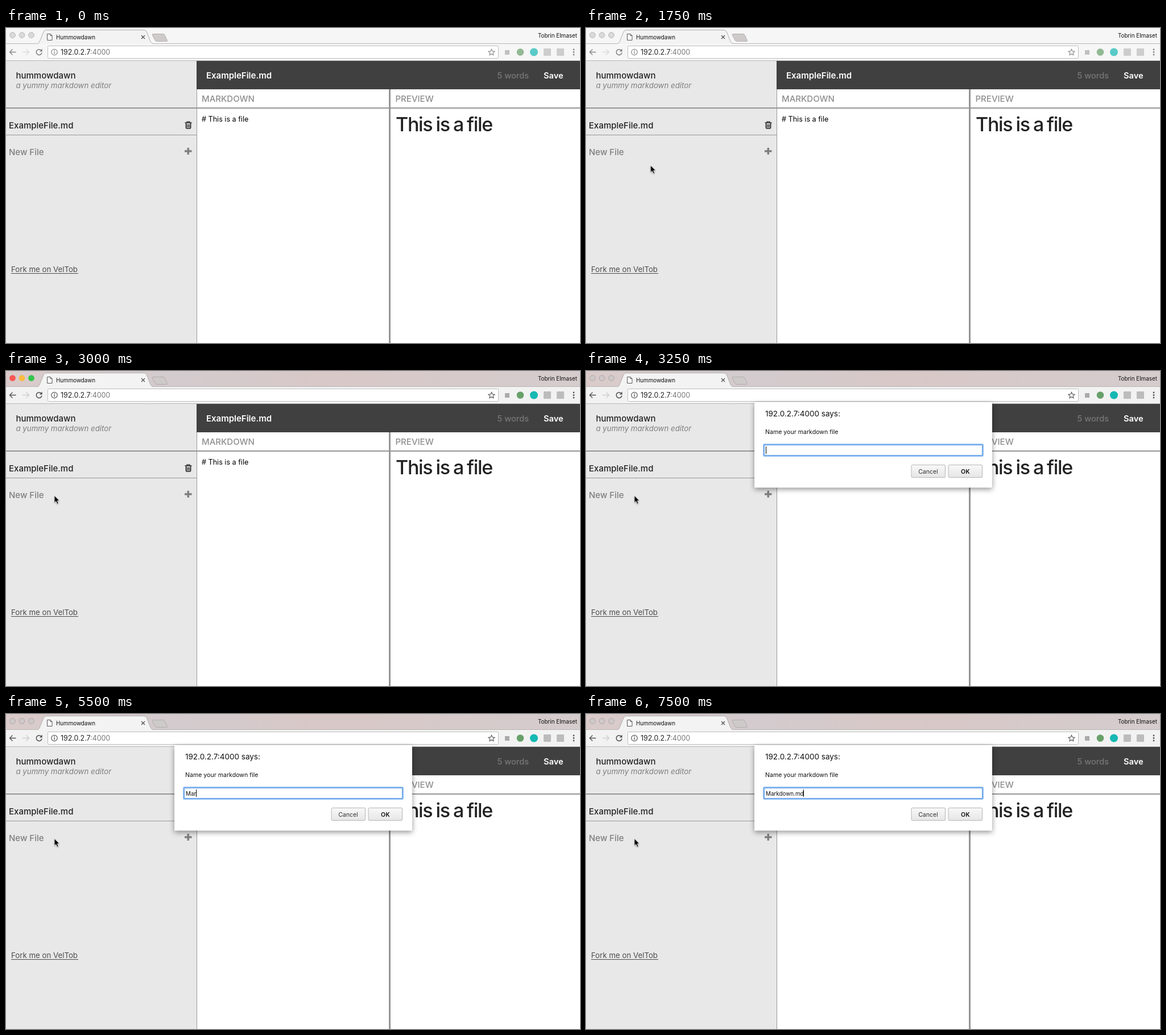
Animation of 1009 by 555 pixels, one loop 8000 ms. Source, as an HTML page:

```html
<!DOCTYPE html>
<html lang="en">
<head>
<meta charset="utf-8">
<title>Editor demo</title>
<style>
  html, body { margin: 0; width: 100%; height: 100%; overflow: hidden; background: #fff; }
  svg { display: block; width: 1009px; height: 555px; font-family: Inter, Roboto, sans-serif; font-optical-sizing: none; }
  text { white-space: pre; }

  .head { font-size: 15px; font-weight: 500; fill: #222; }
  .bold { font-weight: 600; }
  .white { fill: #fff; }
  .muted { fill: #7f7f7f; }
  .label { fill: #8e8e8e; }
  .note { font-size: 13.25px; }
  .small { font-size: 10.6px; fill: #111; }
  .mid { text-anchor: middle; }
  .line { fill: none; stroke: #555; stroke-width: 1.4; }

  /* Every state change is a hard cut. */
  .blur, .focus, .lights, .icons, .arrow, .note-caret, .dialog { animation: 8s step-end infinite; }
  .blur { animation-name: blur; }
  .lights { animation-name: lights; }
  .icons { animation-name: icons; }
  .arrow { animation-name: arrow; }
  .note-caret { animation-name: note-caret; }
  .dialog { animation-name: dialog; filter: drop-shadow(0 3px 5px rgba(0, 0, 0, .42)); }

  @keyframes blur { 0% { opacity: 1 } 25%, 100% { opacity: 0 } }
  @keyframes lights { 0% { opacity: 0 } 25% { opacity: 1 } 40.625%, 100% { opacity: 0 } }
  @keyframes icons { 0% { opacity: .7 } 25%, 100% { opacity: 1 } }
  @keyframes note-caret { 0% { opacity: 0 } 28.125% { opacity: 1 } 31.25%, 100% { opacity: 0 } }
  @keyframes dialog { 0% { opacity: 0 } 40.625%, 100% { opacity: 1 } }
  @keyframes arrow {
    0% { opacity: 0; transform: translate(359px, 219px) }
    9.375% { opacity: 1; transform: translate(359px, 219px) }
    15.625% { opacity: 1; transform: translate(115px, 245px) }
    18.75% { opacity: 1; transform: translate(112px, 239px) }
    21.875% { opacity: 1; transform: translate(113.5px, 242px) }
    31.25% { opacity: 1; transform: translate(89px, 198px) }
    34.375% { opacity: 1; transform: translate(85px, 220.5px) }
    37.5%, 100% { opacity: 1; transform: translate(85px, 219.5px) }
  }
</style>
</head>
<body>
<svg viewBox="0 0 1009 555">
  <defs>
    <linearGradient id="strip">
      <stop offset="0" stop-color="#dacbca"/>
      <stop offset=".3" stop-color="#d3cbce"/>
      <stop offset=".55" stop-color="#d8c8c7"/>
      <stop offset="1" stop-color="#d5cccd"/>
    </linearGradient>
    <linearGradient id="button" x2="0" y2="1">
      <stop offset="0" stop-color="#f8f8f8"/>
      <stop offset="1" stop-color="#e6e6e6"/>
    </linearGradient>
  </defs>

  <!-- tab strip -->
  <rect width="1009" height="28" fill="url(#strip)"/>
  <rect class="blur" width="1009" height="28" fill="#f6f6f6"/>
  <path d="M0 27.5H1009" stroke="#b9b5b5"/>
  <path d="M260 10.5H276Q278 10.5 279 12.5L283.5 22Q284 23.5 282 23.5H265Q263 23.5 262 21.5L257 12Q256.500 10.5 260 10.500Z" fill="#cfcaca" stroke="#b3aeae"/>
  <path d="M55 28Q58 27 59 24L66 7Q67 3.500 71 3.500H242Q246 3.500 247.500 7L254 24Q255.500 27 259 28" fill="#f3f3f3" stroke="#b0acac"/>
  <g fill="#d0c9c9" stroke="#aaa4a4">
    <circle cx="11.500" cy="12.500" r="4.800"/>
    <circle cx="28" cy="12.500" r="4.800"/>
    <circle cx="44.500" cy="12.500" r="4.800"/>
  </g>
  <g class="blur" fill="#d9d9d9" stroke="#c3c3c3">
    <circle cx="11.500" cy="12.500" r="4.800"/>
    <circle cx="28" cy="12.500" r="4.800"/>
    <circle cx="44.500" cy="12.500" r="4.800"/>
  </g>
  <g class="lights">
    <circle cx="11.500" cy="12.500" r="5.300" fill="#fc5753"/>
    <circle cx="28" cy="12.500" r="5.300" fill="#fdbc40"/>
    <circle cx="44.500" cy="12.500" r="5.300" fill="#33c748"/>
  </g>
  <path d="M72.500 10.500H78L81 13.500V21.500H72.500ZM78 10.500V13.500H81" fill="#fff" stroke="#555"/>
  <text class="small" x="88" y="19.500" style="font-size:9.800px">Hummowdawn</text>
  <path class="line" d="M238 13L244 19M244 13L238 19"/>
  <text class="small" x="1004" y="17" text-anchor="end" style="font-size:9.900px">Tobrin Elmaset</text>

  <!-- toolbar -->
  <rect y="28" width="1009" height="30" fill="#f2f2f2"/>
  <rect class="blur" y="28" width="1009" height="30" fill="#f6f6f6"/>
  <path d="M0 57.500H1009" stroke="#b8b8b8"/>
  <rect x="73.500" y="31.500" width="792" height="22" rx="2" fill="#fff" stroke="#bdbdbd"/>
  <g class="icons">
    <path class="line" d="M17.500 42.500H7M11.500 37.500L6.500 42.500L11.500 47.500"/>
    <path class="line" d="M29 42.500H40M35.500 37.500L40.500 42.500L35.500 47.500" style="stroke:#cfcfcf"/>
    <path class="line" d="M62 39.500A4.900 4.900 0 1 0 63 43.500" style="stroke-width:1.600"/>
    <path d="M63.700 36.500V41.500H58.700Z" fill="#555"/>
    <circle class="line" cx="85" cy="42.500" r="5.200" style="stroke-width:1.200"/>
    <path class="line" d="M85 41.500V45.500M85 39V40.400"/>
    <path class="line" d="M853.500 37.300L855.100 40.900L859 41.300L856.100 43.900L856.900 47.700L853.500 45.700L850.100 47.700L850.900 43.900L848 41.300L851.900 40.900Z" style="stroke-width:1.100"/>
    <rect x="877" y="39" width="8" height="8" fill="#aaa"/>
    <circle cx="904" cy="42.500" r="6.300" fill="#68a06a"/>
    <circle cx="928" cy="42.500" r="7" fill="#16b8b3"/>
    <rect x="945" y="36" width="13" height="13" rx="1" fill="#bcbcbc"/>
    <rect x="968" y="36" width="13" height="13" rx="1" fill="#bcbcbc"/>
    <g fill="#555">
      <circle cx="998" cy="38" r="1.400"/>
      <circle cx="998" cy="42.500" r="1.400"/>
      <circle cx="998" cy="47" r="1.400"/>
    </g>
  </g>
  <text x="96" y="47" font-size="12.400" fill="#222">192.0.2.7<tspan fill="#777">:4000</tspan></text>

  <!-- sidebar -->
  <rect y="58" width="335" height="497" fill="#e8e8e8"/>
  <text class="head" x="17.500" y="88.500">hummowdawn</text>
  <text class="note muted" x="17.500" y="106" font-style="italic">a yummy markdown editor</text>
  <text class="head" x="5" y="177">ExampleFile.md</text>
  <text class="head muted" x="5" y="223.500">New File</text>
  <text class="note" x="9" y="430" fill="#4c4c4c">Fork me on VelTob</text>
  <path d="M9 432.500H127" stroke="#4c4c4c"/>
  <path d="M0 188.500H335" stroke="#999"/>
  <g fill="none" stroke="#222">
    <path d="M314.500 167H326.500" stroke-width="1.500"/>
    <path d="M318 167V165.200H323V167" stroke-width="1.300"/>
    <path d="M316.500 168V175.500Q316.500 177 318 177H323Q324.500 177 324.500 175.500V168" stroke-width="1.700"/>
    <path d="M318.700 169.500V175.500M320.500 169.500V175.500M322.300 169.500V175.500" stroke-width="1"/>
  </g>
  <path d="M314 217H326.500M320.250 211V223" stroke="#7f7f7f" stroke-width="3.400"/>

  <!-- editor -->
  <rect x="335" y="58" width="674" height="497" fill="#fff"/>
  <rect x="335" y="58" width="674" height="50" fill="#404040"/>
  <path d="M335.500 108V555" stroke="#999"/>
  <path d="M0 141H1009" stroke="#959595" stroke-width="2"/>
  <path d="M674.500 108V555" stroke="#959595" stroke-width="3"/>
  <text class="head bold white" x="352" y="88.500">ExampleFile.md</text>
  <text class="head" x="863.500" y="88.500" style="fill:#777;font-size:14.600px">5 words</text>
  <text class="head bold white" x="945" y="88.500" style="font-size:14.700px">Save</text>
  <text class="head label" x="344" y="129.500">MARKDOWN</text>
  <text class="head label" x="684.500" y="129.500">PREVIEW</text>
  <text x="344" y="164.500" font-size="12.600"># This is a file</text>
  <text x="685" y="181.500" font-size="34" font-weight="500" fill="#222" letter-spacing="-1.300" word-spacing="-1.600">This is a file</text>
  <rect class="note-caret" x="344" y="173" width="1" height="15"/>

  <!-- prompt -->
  <g class="dialog">
    <rect x="296" y="55" width="418" height="150.500" rx="1" fill="#fff"/>
    <text x="315" y="79.500" font-size="13.500" fill="#111">192.0.2.7:4000 says:</text>
    <text class="small" x="315" y="111">Name your markdown file</text>
    <rect x="312.500" y="129.500" width="385" height="20" rx="1.500" fill="#fff" stroke="#8fbdf2" stroke-width="3"/>
    <rect x="313.500" y="130.500" width="383" height="18" fill="#fff" stroke="#5a9ae4"/>
    <g fill="url(#button)" stroke="#b5b5b5">
      <rect x="572" y="165.500" width="59.500" height="22" rx="1.500"/>
      <rect x="637" y="165.500" width="59.500" height="22" rx="1.500"/>
    </g>
    <text class="small mid" x="601.500" y="180.500" style="fill:#333">Cancel</text>
    <text class="small mid bold" x="666.800" y="180.500">OK</text>
    <text id="typed" class="small" x="316" y="143.500" style="font-size:9.850px"></text>
    <rect id="caret" y="133" width="1" height="13"/>
  </g>

  <!-- pointer -->
  <g class="arrow">
    <path d="M0 0V12.500L2.800 9.900L5 14.700L7.200 13.700L5.100 9.100H9Z" fill="#000" stroke="#fff" stroke-width=".8" style="filter:drop-shadow(0 1px 1px rgba(0,0,0,.3))"/>
  </g>
</svg>
<script>
  const LOOP = 8000;
  const NAME = 'Markdown.md';
  // [time, letters typed, caret visible]
  const STEPS = [
    [0, 0, true], [3750, 0, false], [4250, 0, true], [4750, 0, false],
    [5250, 1, true], [5500, 3, true], [5750, 4, true], [6000, 5, true],
    [6250, 7, true], [6750, 8, true], [7000, 9, true], [7250, 11, true]
  ];
  const typed = document.getElementById('typed');
  const caret = document.getElementById('caret');
  let start = null;

  function draw(now) {
    start ??= now;
    const t = (now - start) % LOOP;
    const [, count, visible] = STEPS.findLast(step => step[0] <= t);
    typed.textContent = NAME.slice(0, count);
    caret.setAttribute('x', 316 + Math.floor(count && typed.getComputedTextLength()));
    caret.setAttribute('opacity', visible ? 1 : 0);
    requestAnimationFrame(draw);
  }
  requestAnimationFrame(draw);
</script>
</body>
</html>
```
